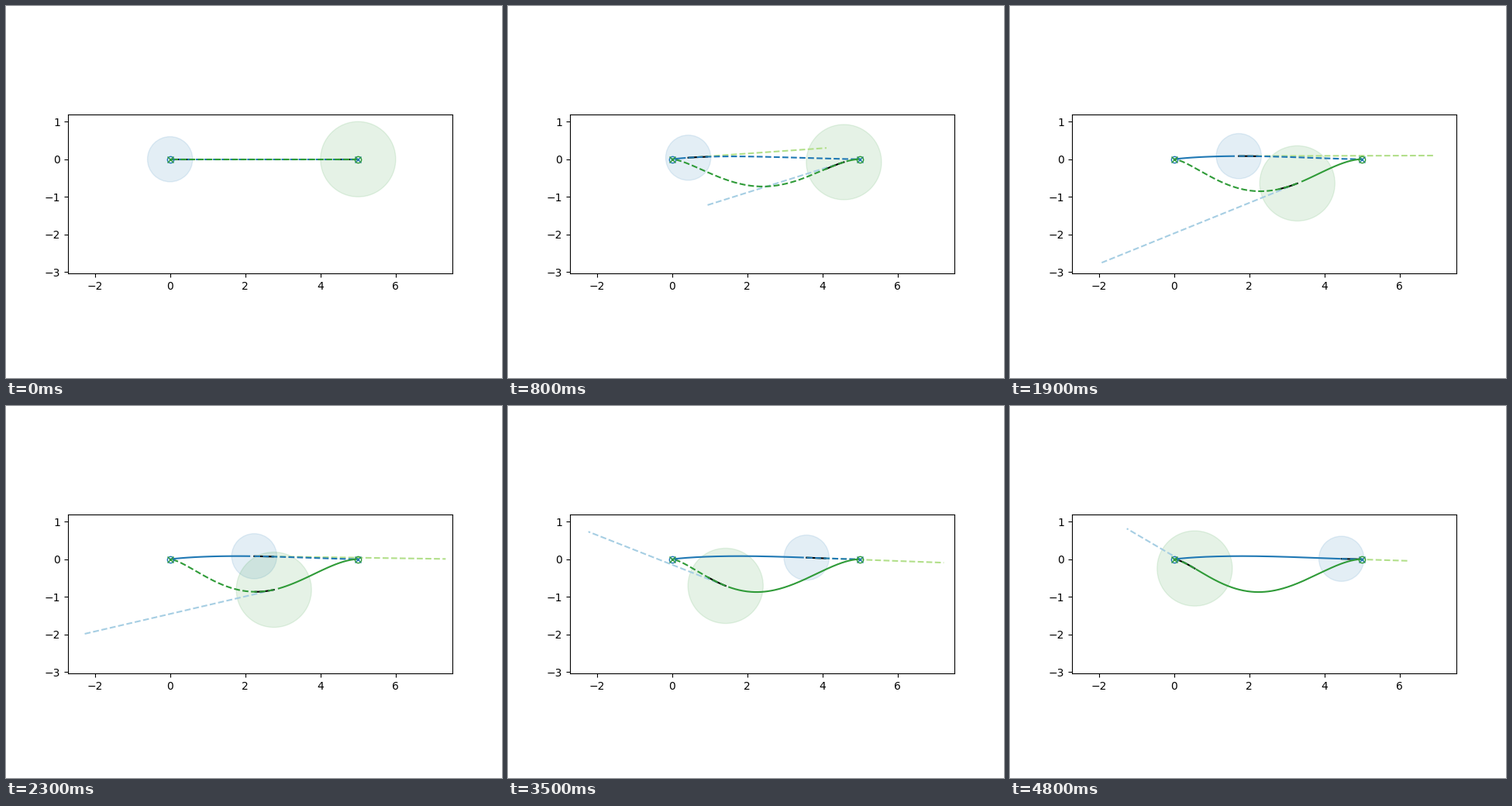
Recreate the animation shown at these times as a matplotlib script. Size 640x480 px, loop 4.9 s.

```python
import numpy as np
import matplotlib.pyplot as plt
from matplotlib.animation import FuncAnimation
from matplotlib.patches import Circle

FRAMES = 49
DISTANCE = 5
HORIZON = 40      # steps of constant-velocity prediction
COMMIT = 0.5      # length of the committed part of a plan
END = 100         # step by which both agents have arrived


def progress(k):
    """Share of the way covered: quick start, long slow arrival."""
    return 1 - np.exp(-(np.maximum(k, 0) / 30.8) ** 1.785)


def bump(p, a, b):
    """Skewed bell on 0..1 with peak height 1."""
    peak = a / (a + b)
    return (p / peak) ** a * ((1 - p) / (1 - peak)) ** b


def head(pts, length):
    """First part of a polyline, cut at the given length."""
    s = np.r_[0, np.cumsum(np.hypot(*np.diff(pts)))]
    q = np.linspace(0, min(length, s[-1]), 30)
    return np.array([np.interp(q, s, axis) for axis in pts])


class Agent:
    def __init__(self, ax, start, goal, sway, skew, radius, color, guess_color, z):
        self.start, self.goal = start, goal
        self.sway, self.skew = sway, skew
        self.disc = ax.add_patch(Circle((start, 0), radius, color=color, alpha=0.12))
        for x, marker in ((start, "o"), (goal, "x")):
            ax.plot(x, 0, marker, color=color, fillstyle="none", zorder=z + 0.2)
        self.guess, = ax.plot([], [], "--", color=guess_color, zorder=2)
        self.commit, = ax.plot([], [], "-", color="black", zorder=2.1)
        self.plan, = ax.plot([], [], "--", color=color, zorder=z)
        self.trail, = ax.plot([], [], "-", color=color, zorder=z)

    def path(self, k):
        p = progress(k)
        x = self.start + (self.goal - self.start) * p
        return np.array([x, self.sway * bump(p, *self.skew)])

    def velocity(self, k, d=0.01):
        return (self.path(k + d) - self.path(k - d)) / (2 * d)

    def ahead(self, k):
        """Planned path; early plans are flatter, most of all near the goal."""
        t = np.linspace(k, END, 300)
        x, y = self.path(t)
        p = progress(k)
        far = (progress(t) - p) / (1 - p) if k else 1
        return np.array([x, y * (1 - np.exp(-k / 7.5) * far)])

    def update(self, k):
        pos = self.path(k)
        plan = self.ahead(k)
        self.disc.center = pos
        self.guess.set_data(*np.array([pos, pos + HORIZON * self.velocity(k)]).T)
        self.commit.set_data(*head(plan, COMMIT))
        self.plan.set_data(*plan)
        self.trail.set_data(*self.path(np.linspace(0, max(k - 1, 0), 4 * k)))


fig, ax = plt.subplots(figsize=(6.4, 4.8), dpi=100)
ax.set_aspect("equal")
ax.set_xlim(-2.713, 7.507)
ax.set_ylim(-3.036, 1.194)

agents = [
    Agent(ax, 0, DISTANCE, 0.083, (0.9, 1.6), 0.6, "#1f78b4", "#b2df8a", 2.2),
    Agent(ax, DISTANCE, 0, -0.873, (1.9, 1.55), 1.0, "#2f9b38", "#a6cee3", 2.3),
]


def update(k):
    for agent in agents:
        agent.update(k)


anim = FuncAnimation(fig, update, frames=FRAMES, interval=100,
                     repeat=True, repeat_delay=0)
plt.show()
```
